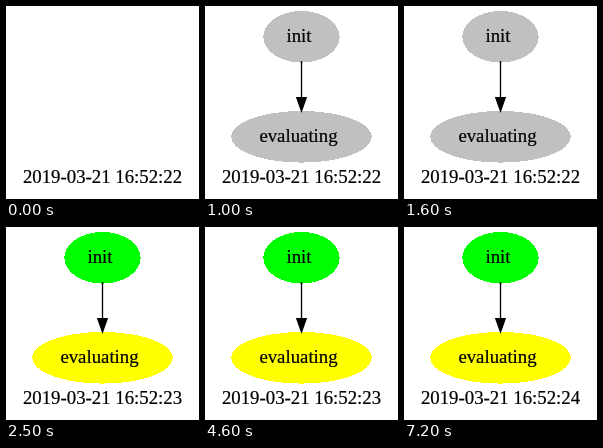
Animation of 193 by 193 pixels, one loop 8000 ms. Source, as an HTML page:

```html
<!DOCTYPE html>
<html lang="en">
<head>
<meta charset="utf-8">
<title>State diagram</title>
<style>
  html, body { margin: 0; width: 100%; height: 100%; overflow: hidden; background: #fff; }
  svg { display: block; width: 100vw; height: 100vh; }
  ellipse { shape-rendering: crispEdges; }
  text {
    font: 18.8px "Liberation Serif", "Times New Roman", serif;
    text-anchor: middle;
    stroke: #000;
    stroke-width: 0.2;
  }
</style>
</head>
<body>
<svg viewBox="0 0 193 193">
  <g id="init">
    <ellipse cx="96.5" cy="30.8" rx="38.2" ry="25.8"/>
    <text x="94" y="36">init</text>
  </g>
  <g id="evaluating">
    <ellipse cx="96.5" cy="130.8" rx="70.2" ry="25.8"/>
    <text x="93.5" y="136">evaluating</text>
  </g>
  <g id="edge" stroke="#000" stroke-width="1.33">
    <path d="M96.5 55V92"/>
    <path d="M91.8 91.7H101.2L96.5 105Z"/>
  </g>
  <text id="clock" x="96.5" y="177"></text>
</svg>
<script>
  const LOOP = 8000;
  const GREY = "#c0c0c0", YELLOW = "#ffff00", GREEN = "#00ff00";
  const $ = id => document.getElementById(id);

  // Each track lists [start time, value]; null means hidden.
  const initTrack = [[0, null], [500, GREY], [2000, YELLOW], [2500, GREEN]];
  const evalTrack = [[0, null], [1000, GREY], [2500, YELLOW]];
  const clockTrack = [[0, 22], [2000, 23], [6000, 24]];

  const at = (track, t) => track.filter(([start]) => start <= t).pop()[1];

  function show(id, visible) {
    $(id).style.display = visible ? "" : "none";
  }

  function paintNode(id, color) {
    show(id, color);
    if (color) $(id).firstElementChild.setAttribute("fill", color);
  }

  function render(t) {
    paintNode("init", at(initTrack, t));
    paintNode("evaluating", at(evalTrack, t));
    show("edge", t >= 1000);
    $("clock").textContent = "2019-03-21 16:52:" + at(clockTrack, t);
  }

  const begin = performance.now();
  function frame() {
    render((performance.now() - begin) % LOOP);
    requestAnimationFrame(frame);
  }
  frame();
</script>
</body>
</html>
```
